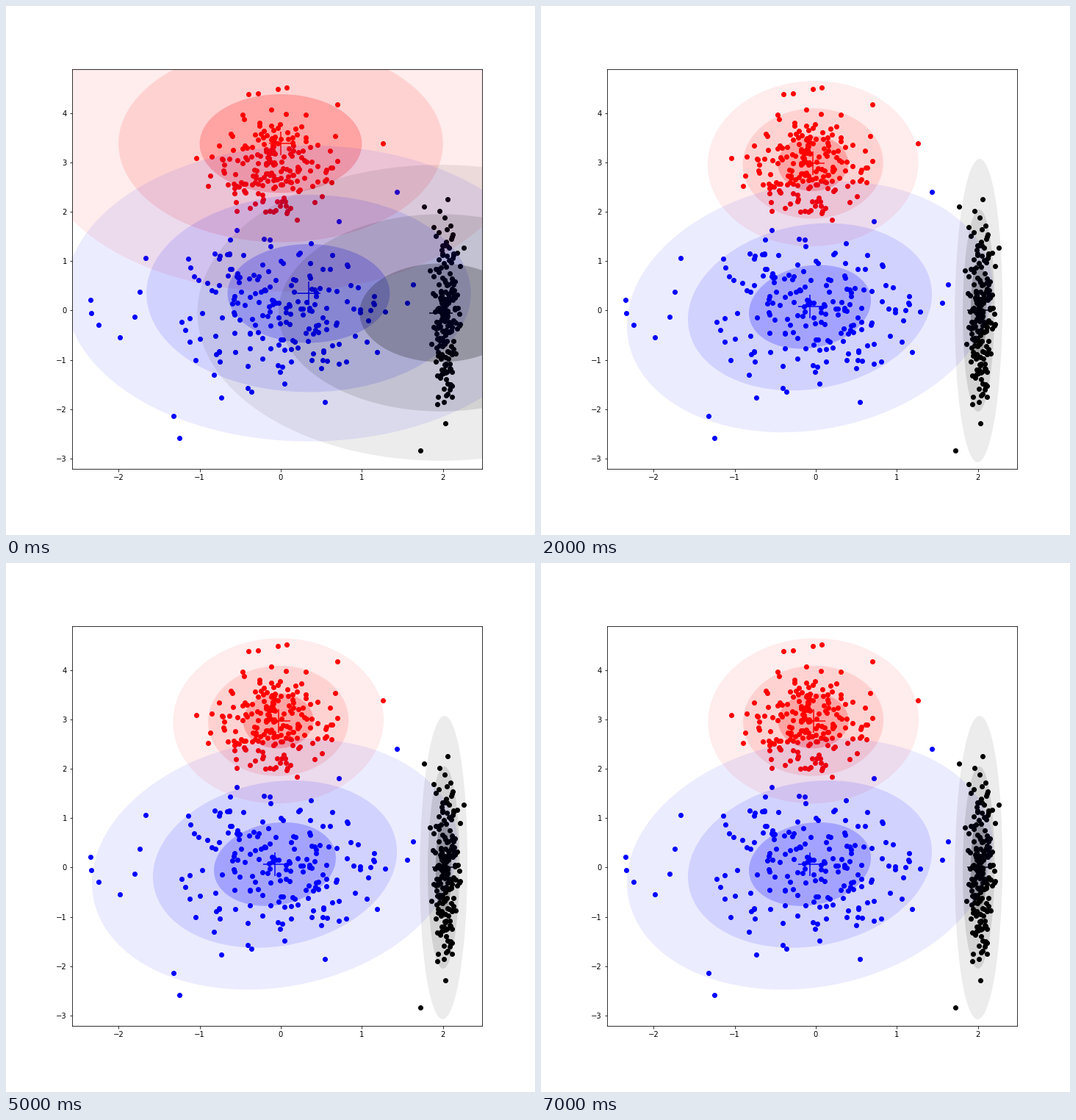
Write a matplotlib script that moves like this. It is 720 px wide and 720 px high and loops after 8 s.

```python
import numpy as np
import matplotlib.pyplot as plt
from matplotlib.animation import FuncAnimation
from matplotlib.patches import Ellipse

COLORS = ("red", "blue", "black")
POINTS_PER_CLUSTER = 200

# centre, spread and reach of the dense core of each cluster
CORES = (
    ((-0.04, 2.98), (0.41, 0.52), (0.92, 1.27)),
    ((-0.02, 0.02), (0.66, 0.75), (1.4, 1.75)),
    ((2.02, 0.03), (0.09, 0.96), (0.21, 2.2)),
)

# a few isolated points around each core
STRAYS = (
    [(-.04, 4.49), (.07, 4.52), (-.40, 4.39), (-.28, 4.40), (.70, 4.18),
     (1.26, 3.39), (-1.04, 3.09)],
    [(-2.35, .21), (-2.34, -.05), (-2.25, -.29), (-1.98, -.54), (-1.80, -.13),
     (-1.74, .38), (-1.67, 1.06), (-1.32, -2.14), (-1.25, -2.59),
     (-.73, -1.77), (.54, -1.85), (1.56, .16), (1.63, .53), (1.43, 2.41),
     (.72, 1.81)],
    [(1.72, -2.84), (2.03, -2.29), (2.06, 2.26), (1.77, 2.11), (2.26, 1.27)],
)

# fitted Gaussians per iteration: mean x, mean y, std x, std y, covariance
RED = (-.034, 2.98, .433, .5585, .004)
BLUE = (-.072, .075, .752, .848, .095)
BLACK = (2.008, 0, .098, 1.025, .004)
STEPS = (
    ((0, 3.385, 1, 1, 0), (.344, .347, 1, 1, 0), (1.972, -.045, 1, 1, 0)),
    ((-.036, 2.98, .426, .5585, .004), (.036, .12, .888, .882, .21),
     (1.958, -.02, .235, 1.018, 0)),
    (RED, BLUE, BLACK),
)
# small drift of the last iterations
SETTLE = (.004, -.006)
FRAMES = 8


def sample_cluster(rng, core, strays):
    centre, spread, reach = map(np.array, core)
    points = list(strays)
    while len(points) < POINTS_PER_CLUSTER:
        offset = rng.normal(0, spread)
        if np.hypot(*(offset / reach)) < 1:
            points.append(centre + offset)
    return np.array(points)


def ellipse_shape(sx, sy, cov):
    """Full axes and angle of the one-sigma ellipse."""
    values, vectors = np.linalg.eigh([[sx * sx, cov], [cov, sy * sy]])
    width, height = 2 * np.sqrt(values)
    return width, height, np.degrees(np.arctan2(vectors[1, 0], vectors[0, 0]))


fig = plt.figure(figsize=(10, 10), dpi=72, facecolor="white")
ax = fig.add_axes([0.125, 0.125, 0.775, 0.755])
ax.set_xlim(-2.572, 2.482)
ax.set_ylim(-3.21, 4.887)

rng = np.random.default_rng(10)
crosses, rings = [], []
for color, core, strays in zip(COLORS, CORES, STRAYS):
    x, y = sample_cluster(rng, core, strays).T
    ax.scatter(x, y, color=color, zorder=1)
    crosses.append(ax.scatter(0, 0, s=1000, marker="+", color=color, zorder=1.1))
    group = [Ellipse((0, 0), 1, 1, facecolor=color, edgecolor="none",
                     alpha=0.22 / n, zorder=1.2) for n in (1, 2, 3)]
    for ring in group:
        ax.add_patch(ring)
    rings.append(group)


def update(frame):
    step = STEPS[min(frame, len(STEPS) - 1)]
    dx, dy = SETTLE if frame >= len(STEPS) else (0, 0)
    for i, (mx, my, *shape) in enumerate(step):
        if COLORS[i] == "red":
            mx += dx
        if COLORS[i] != "black":
            my += dy
        crosses[i].set_offsets([(mx, my)])
        width, height, angle = ellipse_shape(*shape)
        for n, ring in enumerate(rings[i], 1):
            ring.set(center=(mx, my), width=n * width, height=n * height,
                     angle=angle)
    return []


anim = FuncAnimation(fig, update, frames=FRAMES, interval=1000, repeat=True,
                     repeat_delay=0, blit=False)
plt.show()
```
